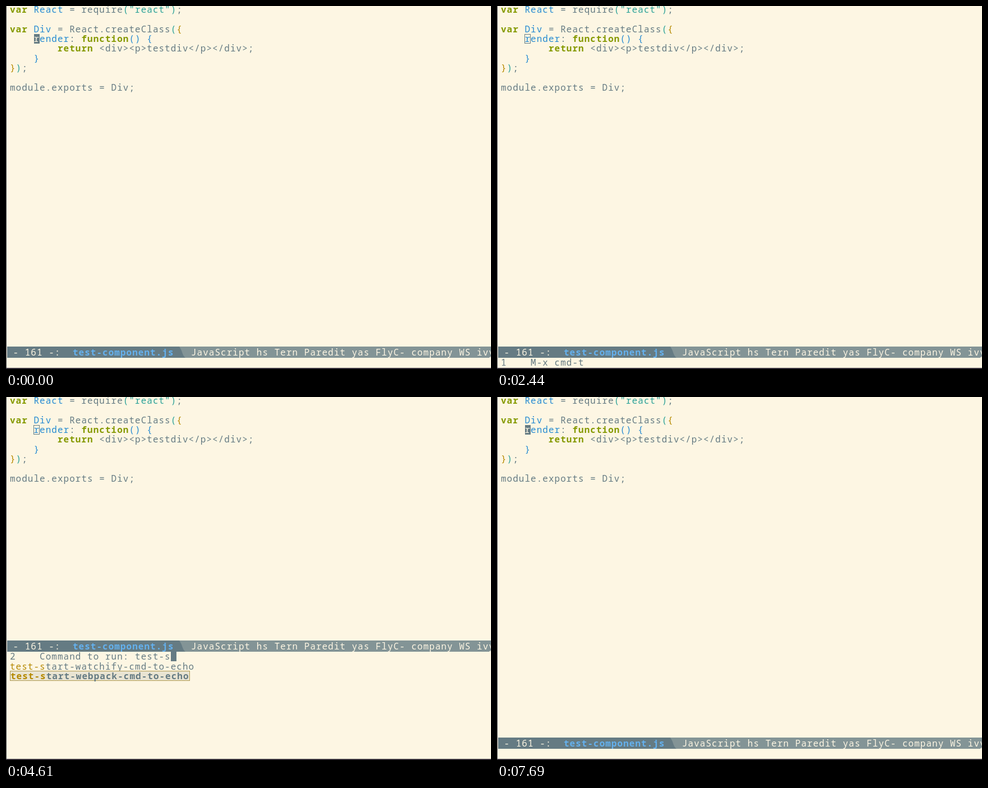
An HTML page with a canvas that plays this animation: 865x647 px, repeating every 8000 ms.

```html
<!DOCTYPE html>
<html lang="en">
<head>
<meta charset="utf-8">
<title>Editor session</title>
<style>
html, body { margin: 0; height: 100%; overflow: hidden; background: #fdf6e3; }
canvas { display: block; }
</style>
</head>
<body>
<canvas id="stage" width="865" height="647"></canvas>
<script>
const ctx = document.getElementById('stage').getContext('2d');
const W = 865, H = 647, LOOP = 8000;
const PITCH = 10.62, LINE = 17.35, LEFT = 7;
const BG = '#fdf6e3', FG = '#657b83', GREEN = '#859900', BLUE = '#268bd2',
      CYAN = '#2aa198', GOLD = '#b58900';

// Runs of [text, colour, bold]; one array per line.
const code = [
  [['var', GREEN, 1], [' '], ['React', BLUE], [' = require'], ['("react")', CYAN], [';']],
  [],
  [['var', GREEN, 1], [' '], ['Div', BLUE], [' = React.createClass'], ['(', CYAN], ['{', GOLD]],
  [['    '], ['render', BLUE], [': '], ['function', GREEN, 1], ['() {', BLUE]],
  [['        '], ['return', GREEN, 1], [' <div><p>testdiv</p></div>;']],
  [['    }', BLUE]],
  [['}', GOLD], [')', CYAN], [';']],
  [],
  [['module.exports = Div;']]
];

const CRACK = ['5x5-crack', '5x5-crack-mutating-best', '5x5-crack-mutating-current', '5x5-crack-randomly'];
const TWO_C = ['2C-associate-buffer', '2C-command', '2C-split', '2C-two-columns'];
const CMD = ['cmd-to-echo', 'compilation-set-cmd-history'];
const TE = ['a2dissite', 'a2ensite', 'acpi_listen', 'akonadi_mailfilter_agent', 'akonadi_sendlater_agent',
  'akonadiselftest', 'animate', 'animate-im6', 'apt-extracttemplates'];
const START = ['test-start-watchify-cmd-to-echo', 'test-start-webpack-cmd-to-echo'];
const TEST = ['akonadiselftest', 'cupstestdsc', 'cupstestppd', 'gtester', 'gtester-report',
  'speaker-test', 'test', ...START];

const pick = (label, count, query, items, extra) => ({ label, count, query, items, ...extra });
const mx = (...args) => pick('M-x ', ...args);
const run = (...args) => pick('Command to run: ', ...args);

const timeline = [
  [0, { editing: true }],
  [1260, mx(4794, '', [...TWO_C, '5x5', ...CRACK])],
  [1430, mx(2615, 'c', [...TWO_C, ...CRACK, '5x5-crack-xor-mutate'])],
  [1530, mx(2, 'cmd', CMD)],
  [1750, mx(2, 'cmd-', CMD)],
  [1870, mx(1, 'cmd-t', CMD.slice(0, 1))],
  [2390, mx(1, 'cmd-t', CMD.slice(0, 1), { cursorAtStart: true })],
  [2440, { echo: '1    M-x cmd-t' }],
  [3600, run(345, 'te', TE)],
  [3730, run(12, 'test', TEST)],
  [3940, run(2, 'test-', START)],
  [4100, run(2, 'test-s', START)],
  [4610, run(2, 'test-s', START, { selected: 1 })],
  [4820, { echo: 'Options: ', cursor: true }],
  [5730, { editing: true, echo: 'cmd-to-echo: test-start command is now active in echo' }],
  [7690, { editing: true }]
];

function rect(x, y, w, h, color) {
  ctx.fillStyle = color;
  ctx.fillRect(x, y, w, h);
}

function outline(x, y, w, h, color) {
  ctx.strokeStyle = color;
  ctx.lineWidth = 1;
  ctx.strokeRect(x + 0.5, y + 0.5, w - 1, h - 1);
}

function text(str, x, y, color = FG, bold) {
  ctx.font = `${bold ? 'bold ' : ''}16px "Noto Sans Mono", monospace`;
  ctx.letterSpacing = '1.02px';
  ctx.fillStyle = color;
  ctx.fillText(str, x, y);
  return x + str.length * PITCH;
}

function runs(list, x, y) {
  for (const [str, color, bold] of list) x = text(str, x, y, color, bold);
}

function drawCode(editing) {
  code.forEach((line, i) => runs(line, LEFT, 12 + i * LINE));
  if (editing) {
    rect(50, 50, 10, 17, FG);
    text('r', LEFT + 4 * PITCH, 12 + 3 * LINE, BG);
  } else {
    outline(49, 50, 11, 17, FG);
  }
}

function drawModeLine(top) {
  rect(2, top, W - 2, 20, '#839496');
  ctx.fillStyle = FG;
  ctx.beginPath();
  ctx.moveTo(2, top);
  ctx.lineTo(309, top);
  ctx.quadraticCurveTo(313, top + 6, 314, top + 10);
  ctx.quadraticCurveTo(316, top + 17, 320, top + 20);
  ctx.lineTo(2, top + 20);
  ctx.fill();
  text('- 161 -:', 12.5, top + 16, BG);
  text('test-component.js', 119, top + 16, '#64b1ee', true);
  text('JavaScript hs Tern Paredit yas FlyC- company WS ivy', 330, top + 16, BG);
}

function drawCandidate(name, index, query, selected) {
  const y = 486 + index * LINE;
  if (selected) {
    const top = Math.round(y) - 15, width = Math.round(name.length * PITCH + 2);
    rect(LEFT, top, width, 18, '#e9e4d2');
    outline(LEFT, top, width, 18, '#b09a50');
  }
  const parts = query ? name.split(new RegExp(`(${query})`, 'i')) : [name];
  // A query such as "c" also matches capitals; odd parts are the matches.
  const styled = name.split && parts.flatMap((part, i) => part ? [[part, i % 2 ? GOLD : FG, selected]] : []);
  runs(styled, LEFT + (selected ? 1 : 0), y);
}

function drawPicker({ label, count, query, items, selected = 0, cursorAtStart }) {
  const counter = String(count).padEnd(5);
  const end = text(counter + label + query, LEFT, 468);
  if (cursorAtStart) {
    rect(LEFT, 454, 10, 17, FG);
    text(counter[0], LEFT, 468, BG);
  } else {
    rect(Math.round(end), 454, 10, 17, FG);
  }
  items.forEach((name, i) => drawCandidate(name, i, query, i === selected));
}

function draw(state) {
  rect(0, 0, W, H, BG);
  drawCode(state.editing);
  drawModeLine(state.items ? 434 : 607);
  if (state.items) drawPicker(state);
  if (state.echo) {
    const end = text(state.echo, LEFT, 641);
    if (state.cursor) rect(Math.round(end), 627, 10, 17, FG);
  }
  rect(0, 0, 1, H, '#4a4a50');
  rect(0, 645, W, 2, '#37323c');
}

function tick() {
  const time = performance.now() % LOOP;
  draw(timeline.findLast(([start]) => start <= time)[1]);
  requestAnimationFrame(tick);
}
tick();
</script>
</body>
</html>
```
